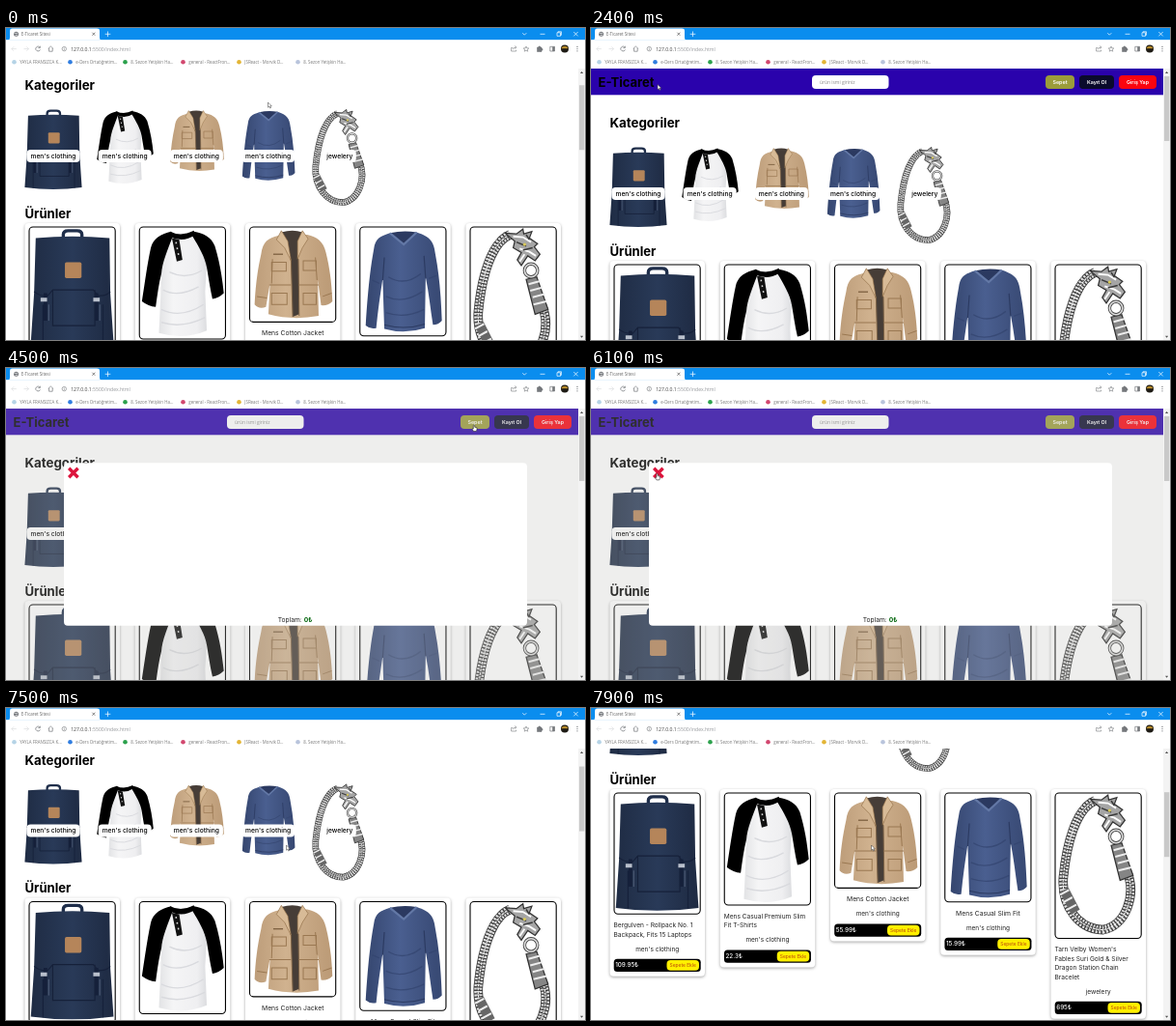
An HTML page for the animation above (8000 ms loop, 600 px wide and 323 px high).

```html
<!DOCTYPE html>
<html lang="tr">
<head>
<meta charset="utf-8">
<title>E-Ticaret Sitesi</title>
<style>
html, body { margin: 0; width: 100%; height: 100%; overflow: hidden; background: #fff; }
svg { display: block; width: 100vw; height: 100vh; }
text { font-family: Inter, "Open Sans", sans-serif; white-space: pre; }
.ui { font-family: "Open Sans", "Noto Sans", sans-serif; }
.card { filter: drop-shadow(.6px 1px 1.8px rgba(0, 0, 0, .36)); }
</style>
</head>
<body>
<svg id="stage" viewBox="0 0 600 323">
  <defs>
    <clipPath id="view"><rect y="42" width="593" height="281"/></clipPath>
    <linearGradient id="navy"><stop stop-color="#1f2c44"/><stop offset=".5" stop-color="#293a58"/><stop offset="1" stop-color="#1e2a42"/></linearGradient>
    <linearGradient id="cloth"><stop stop-color="#e2e3e5"/><stop offset=".3" stop-color="#f5f5f6"/><stop offset=".8" stop-color="#efeff1"/><stop offset="1" stop-color="#dcdde0"/></linearGradient>
    <linearGradient id="tan"><stop stop-color="#bd9d7a"/><stop offset=".4" stop-color="#d0b28f"/><stop offset="1" stop-color="#bb9a76"/></linearGradient>
    <linearGradient id="knit"><stop stop-color="#35466f"/><stop offset=".45" stop-color="#4a5f90"/><stop offset="1" stop-color="#374872"/></linearGradient>

    <g id="backpack">
      <path d="M39 16V6Q39 1 45 1H56Q62 1 62 6V16" fill="none" stroke="#1f2e4a" stroke-width="4"/>
      <path d="M5 10Q50 6 96 10L97 78 101 138Q50 145 -1 138L3 78Z" fill="url(#navy)"/>
      <path d="M3 76Q10 82 20 81L26 74H76L82 81Q92 82 97 76M14 92V139M88 92V139M26 74V118H78V74" fill="none" stroke="#16213a" stroke-width="1.4"/>
      <path d="M17 78V112M80 78V112" stroke="#15203a" stroke-width="4.5"/>
      <path d="M11 86H19M76 86H84" stroke="#b9c0cc" stroke-width="4.5"/>
      <path d="M21 92V112M84 92V112" stroke="#5d6b86"/>
      <rect x="41" y="40" width="20.5" height="19.5" rx="2" fill="#b5855a"/>
    </g>

    <g id="tee">
      <path d="M36 4H64L80 44 78 76 80 124Q52 136 21 127L23 84 24 52Z" fill="url(#cloth)"/>
      <path d="M26 74Q44 84 70 70M24 98Q48 110 76 92M24 114Q50 122 78 108M34 52Q54 62 74 50" fill="none" stroke="#d9dade" stroke-width="1.6"/>
      <path d="M36 2C24 5 14 10 11 22 7 40 4 62 0 88Q8 94 17 95C19 80 21 66 24 54 25 40 32 24 38 8Z"/>
      <path d="M64 2C76 4 86 9 90 20 96 40 99 58 101 78Q95 84 87 85C84 72 82 58 80 46 78 34 70 20 62 7Z"/>
      <path d="M35 2Q48 9 64 1L66 6Q50 17 34 8Z"/>
      <path d="M37 10L46 12 50 37 43 39Z" fill="#111"/>
      <path d="M42 15L46 35" stroke="#ddd" stroke-width="1.8" stroke-dasharray="2 5"/>
    </g>

    <g id="jacket">
      <path d="M32 7C20 10 13 14 11 30 7 48 4 68 3 92Q8 98 17 95L22 66 20 104Q50 112 82 106L81 62 85 93Q93 94 99 88C98 66 96 48 91 28 88 14 80 9 68 6Z" fill="url(#tan)"/>
      <path d="M36 3Q50-1 62 3L60 20 57 34 58 104 50 107 48 40 42 18Z" fill="#463d37"/>
      <path d="M36 1L30 12 40 22 48 38 44 14ZM62 1L69 11 62 22 56 36 56 14Z" fill="#d8bb97" stroke="#937149" stroke-width=".8"/>
      <path d="M48 38L50 107M57 36L58 106" stroke="#7d6347" stroke-width="1.2"/>
      <path d="M24 40H42V51H24ZM63 38H79V50H63ZM24 78H43V92H24ZM63 78H79V92H63ZM21 68H48M58 68H82M24 66L25 36M80 62L78 34M6 82L18 84M87 82L98 78" fill="none" stroke="#9a7852" stroke-width="1.2"/>
      <path d="M26 30H38" stroke="#7a5d3d" stroke-width="1.5"/>
    </g>

    <g id="sweater">
      <path d="M34 4C22 8 16 10 14 24 10 46 7 70 4 118Q10 123 17 121C19 100 22 80 25 60L27 122Q52 129 77 121L78 58C82 78 84 98 87 117Q94 117 98 112C97 84 95 56 90 30 88 14 84 9 67 3L51 15Z" fill="url(#knit)"/>
      <path d="M34 4Q50 0 67 3L51 17Z" fill="#2b3960"/>
      <path d="M34 4L51 18 67 3" fill="none" stroke="#6378a6" stroke-width="2.6"/>
      <path d="M25 62L27 34M78 60L76 32M27 117Q52 124 77 116" fill="none" stroke="#2c3b62" stroke-width="1.4"/>
      <path d="M32 58Q52 70 72 54M29 82Q50 92 74 76M29 102Q52 110 76 98M12 62L21 66M82 60L92 56" fill="none" stroke="#33446e" stroke-width="1.6" opacity=".7"/>
    </g>

    <path id="chain" d="M46 6C22 16 11 60 7 100C4 138 28 165 56 165C84 160 98 122 85 92" fill="none"/>
    <g id="bracelet">
      <use href="#chain" stroke="#3c3c3c" stroke-width="11.5"/>
      <use href="#chain" stroke="#e0e0e0" stroke-width="9.6" stroke-dasharray="2.4 1.6"/>
      <use href="#chain" stroke="#555" stroke-width="4" stroke-dasharray="2 2.2"/>
      <use href="#chain" stroke="#f4f4f4" stroke-width="1.3" stroke-dasharray="3 1.5"/>
      <path d="M66 61L79 58 93 98 77 104Z" fill="#858585" stroke="#333" stroke-width="1.5"/>
      <path d="M8 116L22 143" stroke="#666" stroke-width="12"/>
      <path d="M69 67L83 63M71 75L86 71M74 83L89 79M75 92L91 88M3 122L14 116M7 131L18 125M12 140L23 134" stroke="#eee" stroke-width="2.4"/>
      <circle cx="72" cy="50" r="8" fill="none" stroke="#444" stroke-width="4"/>
      <circle cx="72" cy="50" r="8" fill="none" stroke="#ddd" stroke-width="2"/>
      <path d="M40 4L54 5 62-1 63 5 73 2 70 10 80 17 76 21 83 30 77 38 68 32 60 44 55 37 60 28 50 22 52 14Z" fill="#a5a5a5" stroke="#333" stroke-width="1.5"/>
      <path d="M50 8L62 9 72 15M58 23L70 27 78 32M58 39L64 30" fill="none" stroke="#fff" stroke-width="2.2"/>
      <path d="M54 15L66 20M62 25L74 22M66 6L70 12" stroke="#3a3a3a" stroke-width="1.8"/>
      <circle cx="64" cy="18" r="2" fill="#d8c95a"/>
    </g>
  </defs>
  <g clip-path="url(#view)">
    <g id="page"></g>
    <g id="modal"></g>
  </g>
  <g id="bar"></g>
  <g id="chrome"></g>
  <g id="cursor">
    <path id="arrow" d="M0 0V5.2L1.3 4.1 2.1 6 3 5.6 2.2 3.8H3.8Z" fill="#fff" stroke="#333" stroke-width=".5"/>
    <path id="hand" d="M-.7 3V.3Q0-.6.7.3V2.2L3 2.8V5L2.3 6.4H-.6L-2 4Q-1.8 3.2-.7 4Z" fill="#fff" stroke="#111" stroke-width=".55"/>
  </g>
</svg>
<script>
const $ = id => document.getElementById(id);

const box = (x, y, w, h, r, fill, more = '') =>
  `<rect x="${x}" y="${y}" width="${w}" height="${h}" rx="${r}" fill="${fill}" ${more}/>`;
const text = (x, y, str, size, { fill = '#000', weight = 400, anchor = 'start', cls = '' } = {}) =>
  `<text x="${x}" y="${y + size * .36}" font-size="${size}" fill="${fill}" font-weight="${weight}" text-anchor="${anchor}" class="${cls}">${str}</text>`;
const line = (d, stroke, width = .7, fill = 'none') =>
  `<path d="${d}" fill="${fill}" stroke="${stroke}" stroke-width="${width}"/>`;
const dot = (x, y, r, fill) => `<circle cx="${x}" cy="${y}" r="${r}" fill="${fill}"/>`;
const picture = (id, x, y, width) =>
  `<use href="#${id}" transform="translate(${x} ${y}) scale(${width / 100})"/>`;

const products = [
  { art: 'backpack', ratio: 1.42, type: "men's clothing", price: '109.95', title: ['Bergulven - Rollpack No. 1', 'Backpack, Fits 15 Laptops'] },
  { art: 'tee', ratio: 1.31, type: "men's clothing", price: '22.3', title: ['Mens Casual Premium Slim', 'Fit T-Shirts'] },
  { art: 'jacket', ratio: 1.1, type: "men's clothing", price: '55.99', title: ['Mens Cotton Jacket'] },
  { art: 'sweater', ratio: 1.27, type: "men's clothing", price: '15.99', title: ['Mens Casual Slim Fit'] },
  { art: 'bracelet', ratio: 1.72, type: 'jewelery', price: '695', title: ["Tarn Velby Women's", 'Fables Suri Gold &amp; Silver', 'Dragon Station Chain', 'Bracelet'] },
];

function header() {
  const button = (x, w, label, fill) => box(x, 49, w, 14, 4, fill) +
    text(x + w / 2, 56, label, 5.4, { fill: '#fff', weight: 600, anchor: 'middle' });
  return box(0, 42, 593, 27.3, 0, '#2a02ac') +
    text(7.5, 56, 'E-Ticaret', 13, { weight: 700 }) +
    box(229, 49, 79.5, 14, 4, '#fff') +
    text(237, 56, 'ürün ismi giriniz', 4.9, { fill: '#858585', cls: 'ui' }) +
    button(471, 30, 'Sepet', '#9b9c3a') +
    button(506, 36, 'Kayıt Ol', '#0a0a2c') +
    button(547, 39, 'Giriş Yap', '#fb0410');
}

function category({ art, type }, i) {
  const mid = 49 + i * 74.2, half = type === 'jewelery' ? 17 : 27.5;
  return picture(art, mid - 29, 124, 58) +
    box(mid - half, 165, half * 2, 13, 4, '#fff') +
    text(mid, 171.5, type, 6.7, { weight: 550, anchor: 'middle' });
}

function card({ art, ratio, type, price, title }, i) {
  const x = 24 + i * 114.25, mid = x + 44.7, frame = ratio * 84 + 6;
  const top = 245 + frame + 11.5, cat = top + (title.length - 1) * 9.4 + 15, bar = cat + 10.5;
  const rows = title.map((row, n) => title.length > 1
    ? text(x - .5, top + n * 9.4, row, 6.6, { fill: '#222' })
    : text(mid, top, row, 6.8, { fill: '#222', anchor: 'middle' })).join('');
  return box(x - 4.5, 241, 98.5, bar + 18 - 241, 4, '#fff', 'class="card"') +
    box(x, 245, 89.2, frame, 4, '#fff', 'stroke="#000" stroke-width="1.1"') +
    picture(art, x + 2.6, 248, 84) + rows +
    text(mid, cat, type, 6.5, { fill: '#222', anchor: 'middle' }) +
    box(x - .3, bar, 90, 13.3, 3.5, '#000') +
    text(x + 1.2, bar + 6.5, price + '₺', 6.3, { fill: '#fff', weight: 500 }) +
    box(x + 54.5, bar + 1.3, 33.5, 10.7, 4, '#fff000') +
    text(x + 71.2, bar + 6.7, 'Sepete Ekle', 4.9, { fill: '#b8400c', anchor: 'middle' });
}

function chrome() {
  const grey = '#74777b', marks = [
    [8, '#b5d3e6', 'YAYLA FRANSIZCA K...'],
    [66, '#2f7de0', 'e-Ders Ortaöğretim...'],
    [123, '#2ca14c', '8. Sezon Yetişkin Ha...'],
    [183, '#d2476f', 'general - ReactFron...'],
    [241, '#e3b536', 'JSReact - Morvik D...'],
    [302, '#b9c4dc', '8. Sezon Yetişkin Ha...'],
  ];
  const bookmarks = marks.map(([x, fill, label]) => dot(x + .5, 35.3, 2.3, fill) +
    text(x + 6.3, 35.3, label, 4.4, { fill: '#777', cls: 'ui' })).join('');
  return box(0, 0, 600, 12.6, 0, '#0a8dee') +
    box(0, 12.3, 600, 29.7, 0, '#fff') +
    '<path d="M2 12.5Q4 12.5 4 10V3Q4 .6 6.5 .6H94Q97 .6 97 3V10Q97 12.5 99 12.5Z" fill="#fff"/>' +
    dot(10.5, 6.3, 2.5, grey) + line('M8.5 5.4H12M9.5 7.8L12 7', '#fff', .6) +
    text(15.8, 6.3, 'E-Ticaret Sitesi', 4.5, { fill: '#666', cls: 'ui' }) +
    line('M89.3 4.7L92.3 7.7M92.3 4.7L89.3 7.7', '#555') +
    line('M102.7 6.3H108.3M105.5 3.5V9.1M535.3 5.2L537.3 7.2 539.3 5.2M553.5 6.3H558.5M571 4.8H574.5V8.3H571ZM572 4.8V3.8H575.5V7.3H574.5M588.3 4L592.7 8.4M592.7 4L588.3 8.4', '#fff') +
    line('M10.8 21.6H5.8M8 19.4L5.8 21.6 8 23.8M18.5 21.6H23.5M21.3 19.4L23.5 21.6 21.3 23.8', '#dcdddf') +
    line('M35 20A2.4 2.4 0 1 0 35.4 22.4M35.4 18.7V20.6H33.4M43.7 21.5L46.4 19 49.1 21.5M44.6 21V24.2H48.2V21', grey) +
    `<circle cx="60.3" cy="21.6" r="2.2" fill="none" stroke="${grey}" stroke-width=".6"/>` + line('M60.3 21.2V22.9M60.3 20.2V20.7', grey, .6) +
    text(67.2, 21.7, '127.0.0.1<tspan fill="#95989c">:5500/index.html</tspan>', 5.1, { fill: '#444', cls: 'ui' }) +
    line('M525.2 20.5H523.6V24H528.6V22.7M525.2 22.2Q525.6 20 528.6 20M527.3 18.6L528.9 20 527.3 21.4', grey, .6) +
    line('M539 19L539.8 20.9 541.8 21 540.3 22.3 540.8 24.2 539 23.1 537.2 24.2 537.7 22.3 536.2 21 538.2 20.9Z', grey, .6) +
    line('M550.5 20H552V19H553.5V20H555V21.5H556V23H555V24.5H550.5Z', grey, .6, grey) +
    line('M563.8 19.3H568.5V24H563.8Z', grey) + box(566.2, 19.3, 2.3, 4.7, 0, grey) +
    dot(579, 21.6, 4, '#1d1a14') + '<path d="M575.3 21.2A4 4 0 0 1 582.7 21.2Z" fill="#b98d2c"/>' +
    dot(592, 19.4, .65, grey) + dot(592, 21.6, .65, grey) + dot(592, 23.8, .65, grey) +
    bookmarks;
}

$('page').innerHTML = box(0, 42, 593, 480, 0, '#fff') + header() +
  text(19.5, 98.3, 'Kategoriler', 13.3, { weight: 700 }) +
  products.map(category).join('') +
  text(19.5, 230.8, 'Ürünler', 13.1, { weight: 700 }) +
  products.map(card).join('');

$('modal').innerHTML = box(0, 42, 593, 281, 0, 'rgba(187,187,182,.25)') +
  box(60, 98.3, 480, 168.5, 4, '#fff') +
  line('M65.2 103.8L74.6 113.2M74.6 103.8L65.2 113.2', '#dc143c', 3.4) +
  text(281.7, 260.2, 'Toplam: <tspan fill="#0b6b14" font-weight="700">0₺</tspan>', 6.7, { fill: '#222' });

$('bar').innerHTML = box(593, 42, 7, 281, 0, '#f3f3f3') +
  '<path d="M595 47L596.6 45 598.2 47ZM595 318.7L596.6 320.7 598.2 318.7Z" fill="#505050"/>' +
  box(594, 50, 5.3, 67, 0, '#c9c9c9', 'id="thumb"');

$('chrome').innerHTML = chrome();

// Rows are [ms, value, ...]; values run linearly between rows.
function track(rows, t) {
  const i = rows.findIndex(row => row[0] > t);
  if (i < 0) return rows.at(-1).slice(1);
  const a = rows[i - 1], b = rows[i], k = (t - a[0]) / (b[0] - a[0]);
  return a.slice(1).map((v, n) => v + (b[n + 1] - v) * k);
}

const scrolling = [
  [0, 39], [100, 14], [200, 0], [6800, 0], [6900, 2.2], [7000, 27], [7100, 39],
  [7400, 39], [7500, 44.5], [7600, 74], [7700, 108], [7800, 142], [7900, 157],
];
const pointer = [
  [0, 271.5, 77], [700, 271.5, 77], [1200, 190, 95], [1600, 110, 80], [2100, 45, 60], [2400, 69, 58.5],
  [2600, 66, 50], [2900, 85, 80], [3200, 165, 130], [3400, 224, 140], [3700, 330, 155],
  [4000, 440, 110], [4300, 485, 59], [4500, 485, 59], [4900, 330, 90], [5300, 117, 106],
  [5700, 68.5, 109.5], [6300, 68.5, 109.5], [6900, 184, 145], [7400, 290.5, 142], [7900, 290.5, 142],
];

function draw(t) {
  const [scroll] = track(scrolling, t), [x, y] = track(pointer, t);
  const open = t >= 4500 && t < 6300;
  const hover = (t >= 4200 && t < 4700) || (t >= 5600 && t < 6400);
  $('page').setAttribute('transform', `translate(0 ${-scroll})`);
  $('thumb').setAttribute('y', 50 + scroll * .237);
  $('modal').setAttribute('display', open ? 'inline' : 'none');
  $('cursor').setAttribute('transform', `translate(${x} ${y})`);
  $('arrow').setAttribute('display', hover ? 'none' : 'inline');
  $('hand').setAttribute('display', hover ? 'inline' : 'none');
}

const start = performance.now();
function tick() {
  const t = (performance.now() - start) % 8000;
  draw(Math.floor(t / 100) * 100);
  requestAnimationFrame(tick);
}
tick();
</script>
</body>
</html>
```
